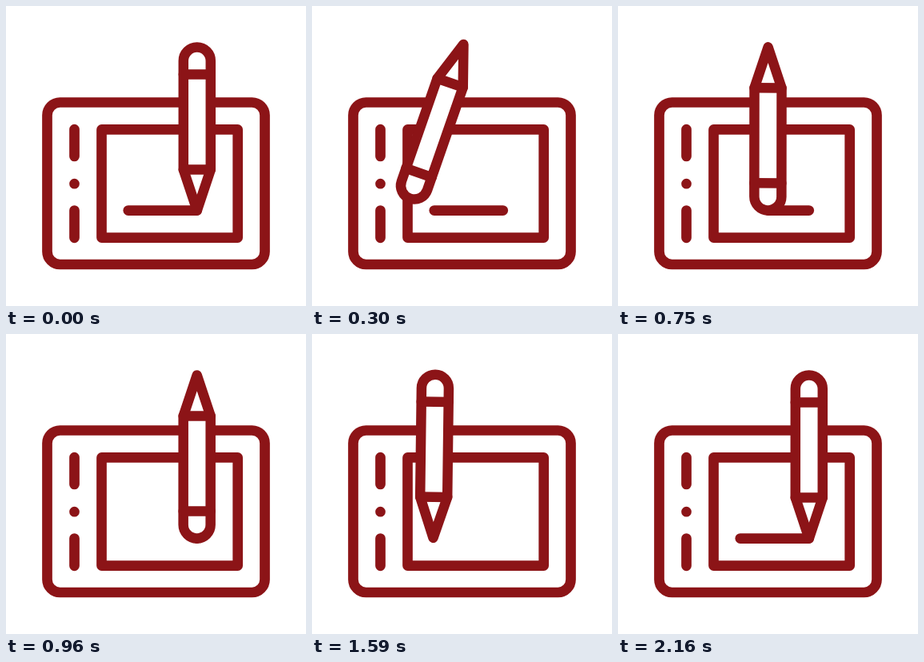
Write an HTML page without scripts that moves like this. It is 375x375 px and loops after 2.25 s.

```html
<!DOCTYPE html>
<html lang="en">
<head>
<meta charset="utf-8">
<title>Drawing tablet</title>
<style>
  @property --t { syntax: "<number>"; inherits: true; initial-value: 0; }
  @property --half { syntax: "<number>"; inherits: true; initial-value: 0; }
  @property --turn { syntax: "<number>"; inherits: true; initial-value: 0; }
  @property --go { syntax: "<number>"; inherits: true; initial-value: 0; }
  @property --back { syntax: "<number>"; inherits: true; initial-value: 0; }
  @property --slide { syntax: "<number>"; inherits: true; initial-value: 0; }

  html, body { margin: 0; width: 100%; height: 100%; overflow: hidden; background: #fff; }

  svg {
    display: block;
    width: 100%;
    height: 100%;
    fill: none;
    stroke: #8c1417;
    stroke-width: 12.7;
    stroke-linecap: round;
    stroke-linejoin: round;

    /* --t counts 30 ms ticks in each half: erase, then draw */
    animation: tick 2250ms -1ms infinite;

    /* S-curves: the pencil flips back to the line start, then slides along it */
    --turn: calc(1 / (1 + pow(5.38 / max(.01, var(--t) - 2), 5.36)));
    --go: calc(1 / (1 + pow(5.38 / max(.01, var(--t) - 20), 5.36)));
    /* travel settles a little sooner than rotation */
    --back: calc(var(--turn) + 2.6 * max(0, var(--turn) - .64) * (1 - var(--turn)));
    --slide: calc(var(--go) + 2.6 * max(0, var(--go) - .64) * (1 - var(--go)));
  }

  @keyframes tick {
    0%      { --t: 0; --half: 0; animation-timing-function: steps(38); }
    50.66%  { --t: 38; --half: 0; animation-timing-function: step-end; }
    50.661% { --t: 2; --half: 1; animation-timing-function: steps(37); }
    100%    { --t: 39; --half: 1; }
  }

  .pencil {
    fill: #fff;
    stroke-width: 12.5;
    transform:
      translate(
        calc(238.8px + 86px * (var(--slide) - var(--back))),
        calc(153.5px - 20px * pow(max(0, 4 * var(--turn) * (1 - var(--turn))), .8)))
      rotate(calc(-180deg * (var(--turn) + var(--half))));
  }

  .stroke {
    fill: #8c1417;
    stroke: none;
    x: calc(146.4px + 86px * var(--slide) * (1 - var(--half)));
    width: calc(12.7px + 86px * (1 - var(--half) + var(--slide) * (2 * var(--half) - 1)));
    opacity: calc(1 - var(--half) + 1000 * var(--slide));
  }
</style>
</head>
<body>
<svg viewBox="0 0 375 375">
  <rect x="51.5" y="120.5" width="272" height="202.5" rx="16"/>
  <rect x="119.5" y="154.4" width="170.2" height="135.2"/>
  <path d="M85.5 154.2V188M85.5 222.2h.01M85.5 255.6V289.8"/>
  <rect class="stroke" y="249.2" height="12.7" rx="6.35"/>
  <g class="pencil">
    <path d="M-17 51V-85A17 17 0 0 1 17-85V51L0 102Z"/>
    <path d="M-17-68H17M-17 51H17"/>
  </g>
</svg>
</body>
</html>
```
